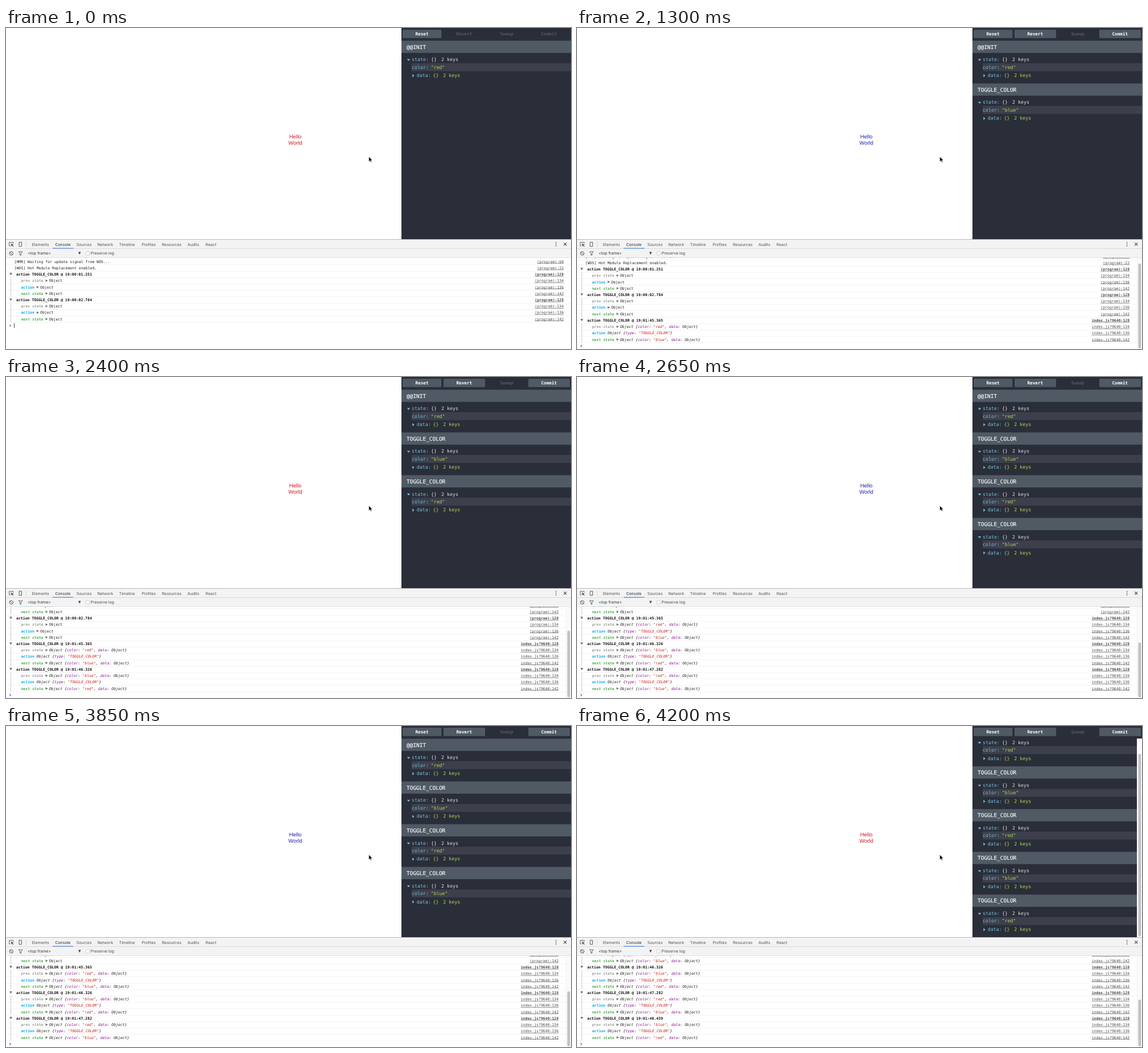
Recreate the animation shown at these times as an HTML page. Size 993 by 564 pixels, loop 4.25 s.

```html
<!DOCTYPE html>
<html lang="en">
<head>
<meta charset="utf-8">
<title>Toggle color</title>
<style>
  html, body { margin: 0; width: 100%; height: 100%; overflow: hidden; background: #fff; }
  svg { display: block; width: 993px; height: 564px; }
  text { white-space: pre; text-rendering: geometricPrecision; }
  .mono { font-family: "DejaVu Sans Mono", monospace; }
  .ui { font-family: Inter, sans-serif; }
  .page { font-family: "Liberation Sans", sans-serif; }
</style>
</head>
<body>
<svg id="stage" viewBox="0 0 993 564">
  <defs>
    <clipPath id="panelClip"><rect x="695" y="22" width="298" height="349"/></clipPath>
    <clipPath id="logClip"><rect y="403.7" width="993" height="161"/></clipPath>
  </defs>
  <g id="page"></g>
  <g id="panel"></g>
  <g id="tools"></g>
  <g id="log"></g>
</svg>
<script>
const LOOP = 4250;
const CHAR = 0.602;          // mono advance per font pixel
const ROW = 11.23, LOG_TOP = 404.6, LOG_SIZE = 6.5;
const ENTRY = 75.1, PANEL_END = 371;

// pending: the newest group shows only its heading
const STEPS = [
  { at: 0, toggles: 0, logs: 2, caret: true },
  { at: 250, toggles: 0, logs: 2 },
  { at: 700, toggles: 0, logs: 3, pending: true },
  { at: 800, toggles: 1, logs: 3 },
  { at: 1700, toggles: 2, logs: 4 },
  { at: 2650, toggles: 3, logs: 5 },
  { at: 3900, toggles: 4, logs: 6 }
];
const STAMPS = ["00:01.251", "00:02.784", "01:45.365", "01:46.326", "01:47.282", "01:48.459"];
const colorAt = n => n % 2 ? "blue" : "red";

const $ = id => document.getElementById(id);
const escape = s => s.replace(/&/g, "&amp;").replace(/</g, "&lt;");
const rect = (x, y, w, h, fill, extra = "") =>
  `<rect x="${x}" y="${y}" width="${w}" height="${h}" fill="${fill}" ${extra}/>`;
const path = (d, fill, extra = "") => `<path d="${d}" fill="${fill}" ${extra}/>`;
const stroke = (d, color, width = 1) => path(d, "none", `stroke="${color}" stroke-width="${width}"`);
const text = (x, y, size, fill, str, cls = "mono", extra = "") =>
  `<text x="${x}" y="${y + size * 0.365}" font-size="${size}" fill="${fill}" class="${cls}" ${extra}>${escape(str)}</text>`;
const down = (x, y, w, h, fill) => path(`M${x - w / 2} ${y - h / 2}h${w}l${-w / 2} ${h}z`, fill);
const right = (x, y, w, h, fill) => path(`M${x - w / 2} ${y - h / 2}v${h}l${w} ${-h / 2}z`, fill);
const BOLD = 'font-weight="700"', MIDDLE = 'text-anchor="middle"';

function drawPage(color) {
  const ink = color === "red" ? "#d0141d" : "#1b1bb4";
  return text(508.5, 190.9, 9.4, ink, "Hello", "page", MIDDLE) +
    text(508.5, 201.7, 9.4, ink, "World", "page", MIDDLE) +
    path("M637.7 226.2v8.6l2-1.8 1.3 3 1.5-.7-1.3-2.9h2.7z", "#000", 'stroke="#fff" stroke-width=".5"');
}

function drawEntry(i, width) {
  const y = 22.3 + i * ENTRY, size = 8.27;
  const key = "#78c0e0", value = "#b2d957", pale = "#dde0e4";
  const line = (dy, ...cells) => cells.map(([x, fill, str]) => text(x, y + dy, size, fill, str)).join("");
  return rect(695, y, width, 21.5, "#4f5a65") +
    text(704, y + 10.8, 9.46, "#fff", i ? "TOGGLE_COLOR" : "@@INIT", "mono", 'stroke="#fff" stroke-width=".15"') +
    down(707.5, y + 34, 5.4, 3.4, key) +
    line(33, [713, key, "state:"], [747, pale, "{}"], [765, pale, "2 keys"]) +
    rect(713, y + 39.5, width - 18, 14, "#3d404c") +
    line(46.2, [713, key, "color:"], [746.7, value, `"${colorAt(i)}"`]) +
    right(716, y + 61.5, 3.4, 5.4, key) +
    line(60.9, [721.8, key, "data:"], [750.5, value, "{}"], [768.3, value, "2 keys"]);
}

function drawPanel(toggles) {
  const overflow = Math.max(0, (toggles + 1) * ENTRY - 349);
  const width = overflow ? 289 : 298;
  let entries = "";
  for (let i = 0; i <= toggles; i++) entries += drawEntry(i, width);
  const buttons = [["Reset", 697, 68.3, 731, true], ["Revert", 769, 73, 805.3, toggles],
    ["Sweep", 843.5, 73, 880, false], ["Commit", 918, 73, 954.3, toggles]];
  return rect(695, 0, 298, PANEL_END, "#2a2e39") +
    buttons.map(([label, x, w, mid, on]) =>
      (on ? rect(x, 3, w, 14.7, "#4f5a65", 'rx="1.5"') : "") +
      text(mid, 10.3, 7.68, on ? "#fff" : "#545963", label, "mono", `${BOLD} ${MIDDLE}`)).join("") +
    `<g clip-path="url(#panelClip)"><g transform="translate(0 ${-overflow})">${entries}</g></g>` +
    (overflow ? rect(984, 22, 9, PANEL_END - 22, "#fafafa") + rect(986.5, 49, 4.8, 320.5, "#c1c1c1", 'rx="2.4"') : "");
}

function drawTools() {
  const ink = "#5a5a5a", size = 6.95;
  const tabs = [["Elements", 45.3], ["Console", 86], ["Sources", 123.3], ["Network", 160],
    ["Timeline", 198.3], ["Profiles", 238], ["Resources", 273.6], ["Audits", 318.5], ["React", 350.4]];
  return rect(0, PANEL_END, 993, 32.7, "#f3f3f3") +
    rect(0, PANEL_END + 0.2, 993, 0.8, "#a9a9a9") +
    rect(0, 387.3, 993, 0.6, "#cccccc") + rect(0, 403.2, 993, 0.6, "#d4d4d4") +
    tabs.map(([label, x]) => text(x + 0.4, 380, size, label === "Console" ? "#222" : "#505050", label, "ui")).join("") +
    rect(82, 386.5, 36.5, 1.1, "#3f7fe0") +
    stroke("M8 382.8h-2.3v-6.2h7v2.2", ink, 0.9) +
    path("M8.3 378.6l5.2 2.1-2 .8 2 2-.8.8-2-2-.8 2z", ink) +
    stroke("M23 376.3h4.4v7.4h-4.4z", ink, 1) +
    rect(35.3, 375, 0.6, 10, "#cccccc") +
    [376.9, 379.9, 382.9].map(y => `<circle cx="966.6" cy="${y}" r=".85" fill="${ink}"/>`).join("") +
    stroke("M980.2 377.3l5 5m0-5l-5 5", "#444", 1.1) +
    `<circle cx="9.2" cy="396" r="3.2" fill="none" stroke="${ink}"/>` +
    stroke("M7 393.8l4.4 4.4", ink) +
    stroke("M22 393h7l-2.6 3v3.2h-1.8v-3.2z", ink, 0.9) +
    text(38, 395.7, size, "#333", "<top frame>", "ui") +
    down(129.3, 395.9, 4.6, 4.6, "#444") +
    rect(140.3, 392.9, 6, 6, "#fff", 'rx=".8" stroke="#b4b4b4" stroke-width=".6"') +
    text(148.8, 395.9, size, "#444", "Preserve log", "ui");
}

const keyName = s => `<tspan fill="#881391">${s}</tspan>`;
const string = s => `<tspan fill="#c41a16">"${s}"</tspan>`;
const stateText = color => `Object {${keyName("color")}: ${string(color)}, ${keyName("data")}: Object}`;
const actionText = `Object {${keyName("type")}: ${string("TOGGLE_COLOR")}}`;

function drawLog({ logs, pending, caret }) {
  const rows = [];
  const add = (body, link, bold) => rows.push({ body, link, bold });
  const plain = (x, y, fill, str, extra) => text(x, y, LOG_SIZE, fill, str, "mono", extra);
  const step = LOG_SIZE * CHAR;

  add(y => plain(14.5, y, "#222", "[HMR] Waiting for update signal from WDS..."), "(program):60");
  add(y => plain(14.5, y, "#222", "[WDS] Hot Module Replacement enabled."), "(program):22");

  const child = (label, fill, source, markup, arrow) => add(y => {
    const x = 26.4 + (label.length + 1) * step;
    const open = markup !== "Object";
    return plain(26.4, y, fill, label, BOLD) +
      (arrow ? right(x + 2.1, y, 4, 4.4, "#6e6e6e") : "") +
      `<text class="mono" x="${x + (arrow ? 6.2 : 0)}" y="${y + LOG_SIZE * 0.365}" font-size="${LOG_SIZE}"
        fill="#222" ${open ? 'font-style="italic"' : ""}>${markup}</text>` +
      rect(8, y - ROW / 2, 0.7, ROW, "#b5b5b5");
  }, source);

  for (let i = 0; i < logs; i++) {
    const old = i < 2;
    const file = old ? "(program):" : "index.js?9640:";
    add(y => down(8.4, y - 0.2, 4.6, 4.4, "#6e6e6e") +
      plain(18, y, "#111", `action TOGGLE_COLOR @ 19:${STAMPS[i]}`, BOLD), file + 128, true);
    if (pending && i === logs - 1) break;
    child("prev state", "#9e9e9e", file + 134, old ? "Object" : stateText(colorAt(i)), true);
    child("action", "#03a9f4", file + 136, old ? "Object" : actionText, old);
    child("next state", "#4caf50", file + 142, old ? "Object" : stateText(colorAt(i + 1)), true);
  }

  const scroll = rows.length > 13 ? (rows.length - 14) * ROW + 9 : 0;
  const inset = scroll ? 9 : 0;
  const centre = i => LOG_TOP + (i + 0.5) * ROW - scroll;
  let out = rect(0, 403.8, 993, 161, "#fff");
  rows.forEach(({ body, link, bold }, i) => {
    const y = centre(i);
    if (y < 395) return;
    const w = link.length * step;
    out += rect(0, y + ROW / 2 - 0.1, 993 - inset, 0.6, "#ececec") + body(y) +
      plain(980.2 - inset - w, y, "#4c4c4c", link, bold ? BOLD : "") +
      rect(980.2 - inset - w, y + 3.2, w, 0.6, "#4c4c4c");
  });

  const y = centre(rows.length) + 0.2;
  out += stroke(`M6.2 ${y - 1.9}l2.3 2-2.3 2`, "#3b82e6", 1.1);
  if (caret) out += rect(14.1, y - 4, 0.8, 8, "#111");
  if (scroll) {
    const thumb = 160 * 160 / ((rows.length + 1) * ROW + 0.8);
    out += rect(984, 403.8, 9, 161, "#fafafa") + rect(984, 403.8, 0.6, 161, "#ebebeb") +
      rect(986.5, 565 - thumb, 4.8, thumb - 2, "#c1c1c1", 'rx="2.4"');
  }
  return `<g clip-path="url(#logClip)">${out}</g>`;
}

$("tools").innerHTML = drawTools();
const start = performance.now();
let shown;

function tick() {
  const time = (performance.now() - start) % LOOP;
  const state = STEPS.filter(s => s.at <= time).pop();
  if (state !== shown) {
    shown = state;
    $("page").innerHTML = drawPage(colorAt(state.toggles));
    $("panel").innerHTML = drawPanel(state.toggles);
    $("log").innerHTML = drawLog(state);
  }
  requestAnimationFrame(tick);
}
tick();
</script>
</body>
</html>
```
